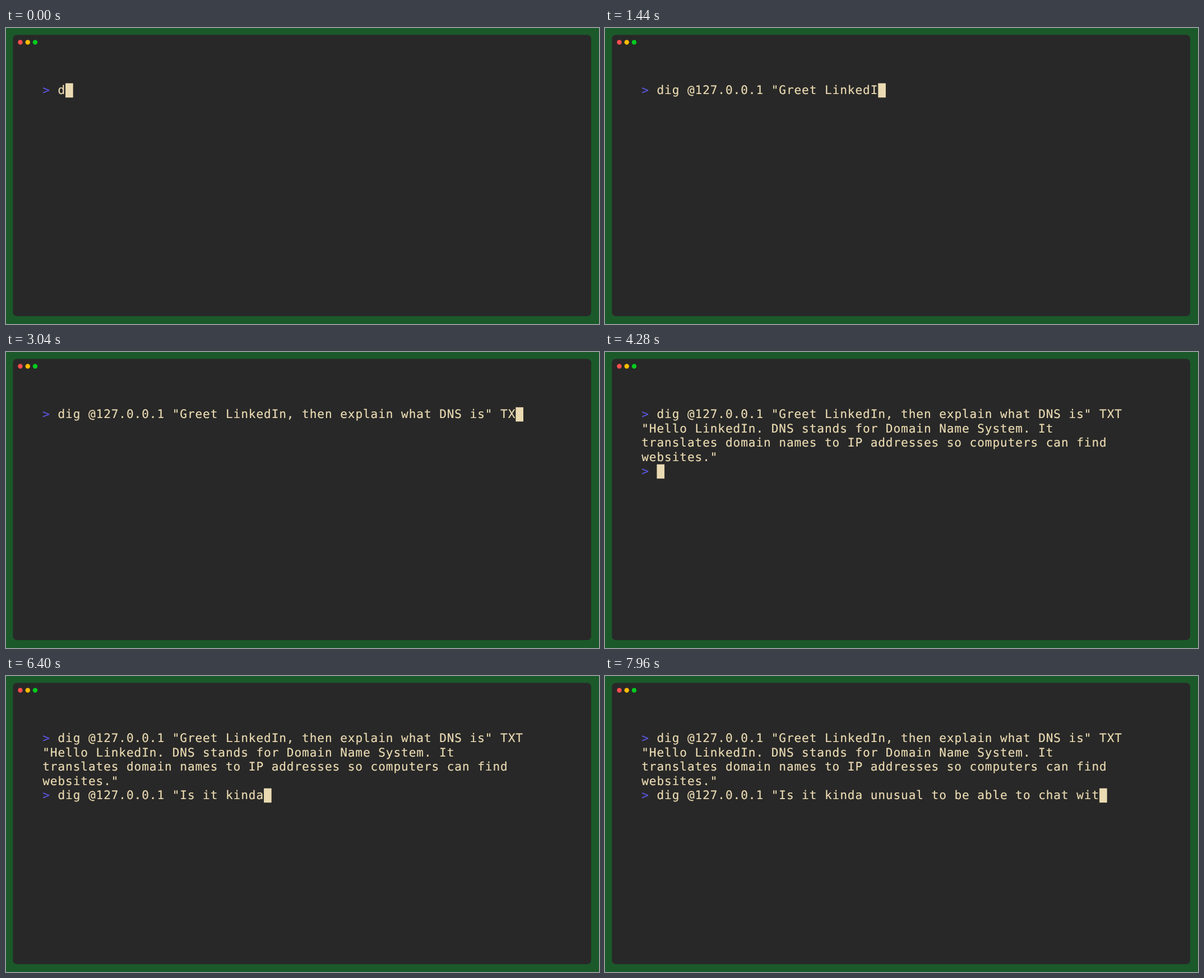
Recreate the animation shown at these times as an HTML page. Size 1058 px wide and 529 px high, loop 8 s.

```html
<!DOCTYPE html>
<html lang="en">
<head>
<meta charset="utf-8">
<title>Terminal</title>
<style>
  html, body { margin: 0; width: 100%; height: 100%; overflow: hidden; background: #1b592a; }
  svg { display: block; width: 100%; height: 100%; }
  text {
    font: 21.16px "DejaVu Sans Mono", monospace;
    letter-spacing: 0.876px;
    white-space: pre;
    text-rendering: geometricPrecision;
    fill: #ebdbb2;
    stroke: #ebdbb2;
    stroke-width: 0.2px;
  }
  .prompt { fill: #5b56e0; stroke: #5b56e0; }
</style>
</head>
<body>
<svg id="stage" viewBox="0 0 1058 529">
  <rect width="1058" height="529" fill="#1b592a"/>
  <rect x="12.3" y="12.3" width="1031.7" height="502.7" rx="7" fill="#282828"/>
  <circle cx="25.5" cy="25.5" r="4.2" fill="#ff4f4d"/>
  <circle cx="38.8" cy="25.5" r="4.2" fill="#febb00"/>
  <circle cx="52" cy="25.5" r="4.2" fill="#00cc1d"/>
</svg>
<script>
const LOOP = 8000, TICK = 40;
const LEFT = 65.24, TOP = 98.75, CELL = 13.615, ROW = 25.5, BASE = 19.3;
const ENTER = 3120, RESUME = 5080, BLINK = 600, FIRST_BLINK = 3680;

const ask = 'dig @127.0.0.1 "Greet LinkedIn, then explain what DNS is" TXT';
const reply = [
  '"Hello LinkedIn. DNS stands for Domain Name System. It',
  'translates domain names to IP addresses so computers can find',
  'websites."'
];
const followUp = 'dig @127.0.0.1 "Is it kinda unusual to be able to chat wit';

// [time, characters typed]; the pace is even between two entries
const askPace = [[0, 1], [40, 1], [80, 2], [920, 19], [1440, 29], [1480, 30],
  [1760, 36], [2360, 48], [2400, 48], [2440, 49], [2600, 52], [3080, 61]];
const followPace = [[RESUME, 1], [5760, 14], [5800, 15], [5840, 16], [6680, 33],
  [6760, 34], [6960, 38], [7000, 39], [7560, 50], [7600, 51], [7960, 58]];

const stage = document.getElementById("stage");

function add(tag, attrs) {
  const el = document.createElementNS("http://www.w3.org/2000/svg", tag);
  for (const key in attrs) el.setAttribute(key, attrs[key]);
  return stage.appendChild(el);
}

function addLine(col, row, content = "", cls = "") {
  const el = add("text", { x: LEFT + col * CELL, y: TOP + row * ROW + BASE, class: cls });
  el.textContent = content;
  return el;
}

addLine(0, 0, ">", "prompt");
const askLine = addLine(2, 0);
const afterEnter = reply.map((line, i) => addLine(0, i + 1, line));
afterEnter.push(addLine(0, 4, ">", "prompt"));
const followLine = addLine(2, 4);
const cursor = add("rect", { width: CELL, height: ROW, fill: "#ebdbb2" });

function typed(pace, t) {
  if (t < pace[0][0]) return 0;
  const next = pace.findIndex(([time]) => time > t);
  if (next < 0) return pace[pace.length - 1][1];
  const [t0, n0] = pace[next - 1], [t1, n1] = pace[next];
  return Math.floor(n0 + (n1 - n0) * (t - t0) / (t1 - t0));
}

function show(el, on) {
  el.setAttribute("visibility", on ? "visible" : "hidden");
}

function draw(time) {
  const t = Math.floor(time % LOOP / TICK) * TICK;
  const answered = t >= ENTER;
  const askCount = typed(askPace, t), followCount = typed(followPace, t);

  askLine.textContent = ask.slice(0, askCount);
  followLine.textContent = followUp.slice(0, followCount);
  afterEnter.forEach(el => show(el, answered));

  cursor.setAttribute("x", LEFT + (2 + (answered ? followCount : askCount)) * CELL);
  cursor.setAttribute("y", TOP + (answered ? 4 * ROW : 0));
  const idle = t >= FIRST_BLINK && t < RESUME;
  show(cursor, !idle || Math.floor((t - FIRST_BLINK) / BLINK) % 2 === 1);
}

function loop() {
  draw(performance.now());
  requestAnimationFrame(loop);
}
loop();
</script>
</body>
</html>
```
